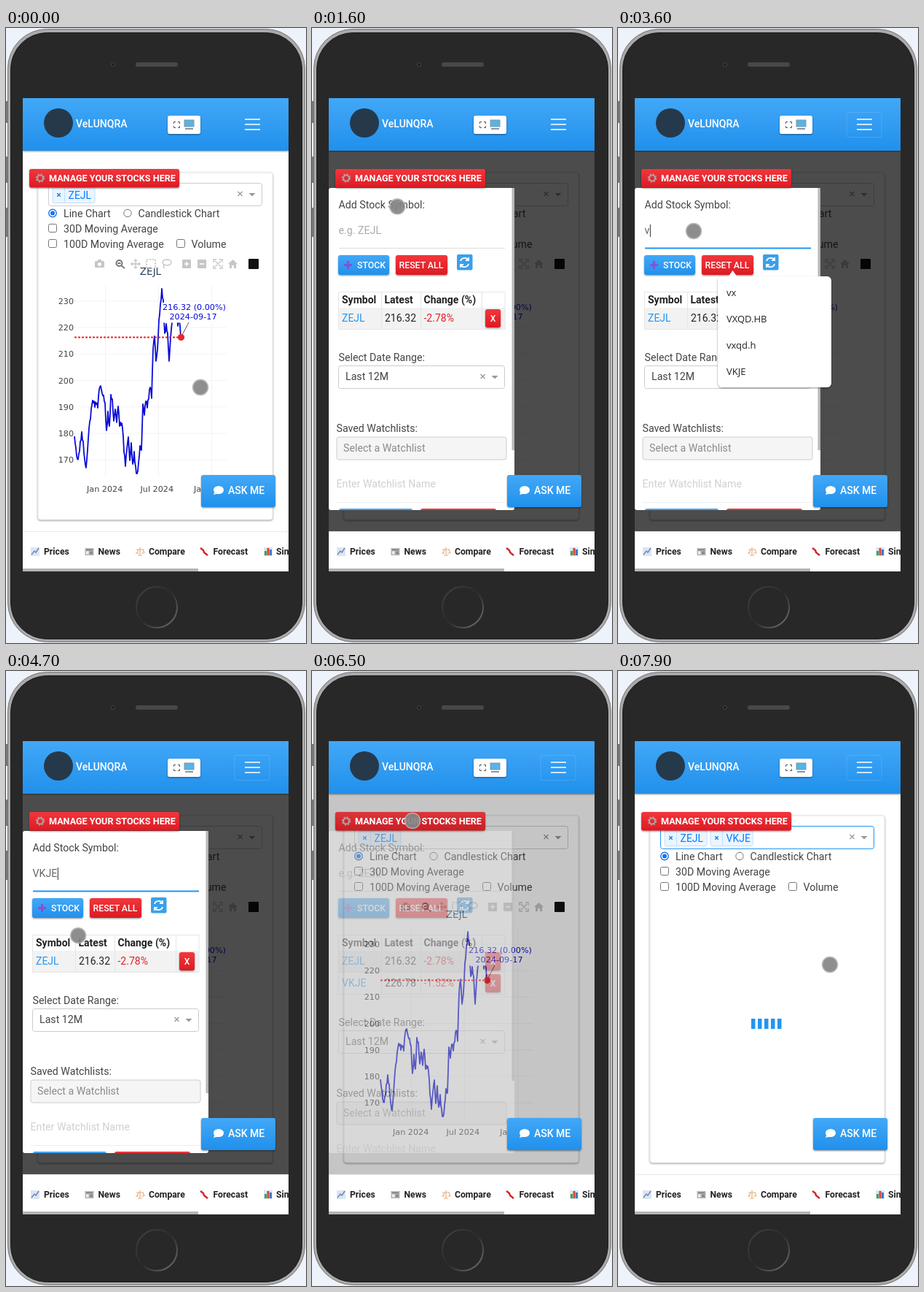
Animation of 412x842 px, one loop 8000 ms. Source, as an HTML page:

```html
<!DOCTYPE html>
<html lang="en">
<head>
<meta charset="utf-8">
<title>Stock dashboard on a phone</title>
<style>
html, body { margin: 0; width: 100%; height: 100%; overflow: hidden; background: #eef2fb; }
svg { display: block; width: 100%; height: 100%; font: 14.2px Roboto, sans-serif; }
.plot { font-family: "DejaVu Sans", sans-serif; }
</style>
</head>
<body>
<svg id="stage" viewBox="0 0 412 842"></svg>
<script>
const BLUE = '#2196f3', RED = '#e51c23', INK = '#444', LINK = '#007eff';
const BRAND = 'VeLUNQRA', FIRST = 'ZEJL', SECOND = 'VKJE';

const rect = (x, y, w, h, fill, more = '') =>
  `<rect x="${x}" y="${y}" width="${w}" height="${h}" fill="${fill}" ${more}/>`;
const text = (x, y, str, fill = INK, more = '') =>
  `<text x="${x}" y="${y}" fill="${fill}" ${more}>${str}</text>`;
const path = (d, stroke, width = 1, more = '') =>
  `<path d="${d}" fill="none" stroke="${stroke}" stroke-width="${width}" ${more}/>`;
const dot = (x, y, r, fill, more = '') =>
  `<circle cx="${x}" cy="${y}" r="${r}" fill="${fill}" ${more}/>`;
const group = (id, body, more = '') => `<g id="${id}" ${more}>${body}</g>`;
const font = (size, weight = 400) => `font-size="${size}" font-weight="${weight}"`;
const button = (x, y, w, h, paint, more = '') =>
  rect(x, y, w, h, `url(#${paint})`, `rx="3" filter="url(#shadow)" ${more}`);
const cross = (x, y, s = 3, color = '#999') =>
  path(`M${x - s} ${y - s}l${2 * s} ${2 * s}m0 ${-2 * s}l${-2 * s} ${2 * s}`, color, 1.3);
const clearIcons = (x, y) => cross(x, y) +
  `<path d="M${x + 12} ${y - 1}h9l-4.5 4.5z" fill="#999"/>`;
const linear = (id, top, bottom) => `<linearGradient id="${id}" x2="0" y2="1">
  <stop stop-color="${top}"/><stop offset="1" stop-color="${bottom}"/></linearGradient>`;

const defs = `<defs>
  ${linear('blue', '#42a8f7', '#2190ec')}${linear('red', '#f2363c', '#dc1b23')}
  ${linear('darkBlue', '#3d8fdb', '#2277c6')}${linear('darkRed', '#dc363b', '#c81e25')}
  <linearGradient id="ring" x2="1" y2="1"><stop stop-color="#444"/>
    <stop offset=".5" stop-color="#2a2a2a"/><stop offset="1" stop-color="#777"/></linearGradient>
  <filter id="shadow" x="-10%" y="-20%" width="120%" height="150%">
    <feDropShadow dx="0" dy="1" stdDeviation="1.2" flood-opacity=".45"/></filter>
  <clipPath id="screen">${rect(23, 96, 365, 648, '#fff')}</clipPath>
  <clipPath id="panelClip">${rect(23, 219, 255, 441, '#fff')}</clipPath>
</defs>`;

const phone =
  [[100, 30], [176, 36], [246, 40]].map(([y, h]) => rect(0, y, 4, h, '#777')).join('') +
  rect(2.5, 1.5, 408, 839, '#aaa', 'rx="54" stroke="#777"') +
  rect(6.5, 6.5, 400, 830, '#282828', 'rx="50" stroke="#1a1a1a"') +
  dot(147, 50, 2.5, '#1b1b1b', 'stroke="#484848"') +
  rect(178, 47, 58, 6, '#484848', 'rx="3"') +
  dot(207, 793, 28, 'none', 'stroke="url(#ring)" stroke-width="2"');

const header = rect(23, 96, 365, 72, 'url(#blue)', 'filter="url(#shadow)"') +
  dot(72, 130, 20, '#26394b') +
  text(96, 136, BRAND, '#fff', font(14, 500)) +
  rect(222, 120, 45, 25, '#fff', 'rx="3" filter="url(#shadow)"') +
  path('M230.5 131v-2.500h2.500m3 0h2.500v2.500m0 3v2.500h-2.500m-3 0h-2.500v-2.500', '#555') +
  rect(245, 126, 13, 9, '#55b4e8', 'stroke="#8796a0"') + rect(246, 137, 11, 2, '#8796a0') +
  group('menuBox', rect(314, 115.5, 48, 34, 'none', 'rx="3" stroke="#fff" stroke-opacity=".13"')) +
  path('M328 125h21m-21 7h21m-21 7h21', '#fff', 1.4);

const chip = (x, name) => rect(x, 218.5, 58, 21, '#ebf5ff', 'rx="2" stroke="#c2e0ff"') +
  path(`M${x + 16.5} 219v20`, '#c2e0ff') + cross(x + 8.5, 228.5, 2.2, LINK) +
  text(x + 21.5, 234, name, LINK, font(14));
const checkbox = (x, y) => rect(x - 5.500, y - 5.500, 11, 11, '#fff', 'rx="2" stroke="#767676"');

const card = rect(44, 198, 322, 475, '#fff', 'rx="3" stroke="#e4e4e4" filter="url(#shadow)"') +
  rect(58.5, 212.5, 293, 31, '#fff', 'id="picker" rx="3" stroke="#ccc"') +
  chip(64, FIRST) + group('secondChip', chip(127, SECOND)) + clearIcons(321.5, 227) +
  dot(64, 253.500, 5.200, '#fff', 'stroke="#1a73e8" stroke-width="1.4"') + dot(64, 253.500, 3, '#1a73e8') +
  dot(167, 253.500, 5.200, '#fff', 'stroke="#767676"') +
  checkbox(64, 274) + checkbox(64, 295) + checkbox(240, 295) +
  text(79, 259, 'Line Chart') + text(181.5, 259, 'Candlestick Chart') +
  text(79, 280, '30D Moving Average') + text(79, 301, '100D Moving Average') +
  text(254.5, 301, 'Volume');

const GREY = '#c6c6c6';
const toolbar = rect(122, 319, 13, 9, GREY, 'rx="1.5"') + rect(126, 317, 5, 3, GREY) +
  dot(128.5, 323.5, 2.5, '#fff') +
  dot(155.5, 322, 4, 'none', 'stroke="#777" stroke-width="2"') + path('M158 325l5 4m-9.500-7h4', '#777', 1.8) +
  path('M172 323h12m-6-6v12m-4-8l-2 2 2 2m8-4l2 2-2 2m-6-6l2-2 2 2m-4 8l2 2 2-2', GREY, 1.4) +
  rect(193, 317, 12, 12, 'none', `stroke="${GREY}" stroke-width="1.6" stroke-dasharray="2.500 1.500"`) +
  `<ellipse cx="221" cy="321" rx="6" ry="4" fill="none" stroke="${GREY}" stroke-width="1.4"/>` +
  path('M217 324q-2 3 1 5', GREY, 1.4) +
  [248, 269].map(x => rect(x - 6, 317, 12, 12, GREY, 'rx="1"') + path(`M${x - 3} 323h6`, '#fff', 1.6)).join('') +
  path('M248 320v6', '#fff', 1.6) +
  path('M285 321v-4h4m4 0h4v4m0 4v4h-4m-4 0h-4v-4m2-6l8 8m0-8l-8 8', GREY, 1.4) +
  `<path d="M305 323l6.500-6 6.500 6h-2v6h-3v-4h-3v4h-3v-6z" fill="${GREY}"/>` +
  rect(333, 316, 14, 14, '#111', 'rx="1"');

// Daily prices as screen heights, two pixels apart
const prices = [559, 575, 590, 583, 566, 553, 566, 590, 602, 578, 548, 535, 516, 513, 519, 515, 520, 495,
  490, 500, 503, 513, 551, 525, 545, 502, 508, 538, 522, 540, 518, 545, 544, 548, 580, 600, 577, 560, 592,
  568, 597, 580, 600, 610, 595, 572, 578, 515, 530, 511, 520, 508, 492, 507, 440, 422, 456, 440, 400, 378,
  357, 372, 418, 405, 418, 456, 425, 403, 390, 395, 392, 408, 400, 423];
const wiggle = i => Math.sin(i * 12.9) * 5;
const priceLine = 'M' + prices.map((y, i) =>
  i ? `${93 + 2 * i} ${((y + prices[i - 1]) / 2 + wiggle(i)).toFixed(1)} ${94 + 2 * i} ${y}` : `94 ${y}`).join('L');
const levels = [230, 220, 210, 200, 190, 180, 170];
const levelY = v => 374 + (230 - v) * 3.62;

const chart = text(198.5, 338, FIRST, '#2a3f5f', font(13.5) + ' text-anchor="middle"') + toolbar +
  levels.map(v => path(`M94 ${levelY(v)}H303`, '#f1f3f8') +
    text(93, levelY(v) + 4, v, INK, font(11.2) + ' text-anchor="end"')).join('') +
  path('M136.500 352V614M209.500 352V614M282.500 352V614', '#f1f3f8') +
  path(priceLine, '#0a0ad8', 1.8, 'stroke-linejoin="round"') +
  path('M94 423.500H240', '#e8262c', 2, 'stroke-dasharray="3 2"') +
  rect(214.5, 376, 89, 27.5, '#fff') + path('M251 403L241 422', '#555') +
  dot(240.5, 423.5, 4.6, '#e8262c') +
  text(258.5, 386, '216.32 (0.00%)', '#0a0ad8', font(11.2) + ' text-anchor="middle"') +
  text(257, 399, '2024-09-17', '#0a0ad8', font(11.2) + ' text-anchor="middle"') +
  ['Jan 2024', 'Jul 2024', 'Jan 2025'].map((s, i) => text(111 + 73.5 * i, 635, s, INK, font(11.2))).join('');

const loader = [0, 1, 2, 3, 4].map(i => rect(183 + 9 * i, 476, 5.5, 14, BLUE)).join('');

const deleteKey = y => button(238, y, 21, 25, 'red') +
  text(248.5, y + 17, 'X', '#fff', font(12, 500) + ' text-anchor="middle"');
const row = (y, name, price, change) => rect(36, y, 229, 29.5, y < 400 ? '#f2f2f2' : '#fff') +
  path(`M36.500 ${y}v29.500h228.500v-29.500M95.500 ${y}v29.500M149.500 ${y}v29.500M233.500 ${y}v29.500`, '#e6e6e6') +
  text(41, y + 19, name, BLUE, font(14)) + text(100, y + 19, price, '#222', font(14)) +
  text(153.500, y + 19, change, RED, font(14)) + deleteKey(y + 2);

const lower = text(36.5, 456, 'Select Date Range:') +
  rect(36.5, 462.5, 228, 31, '#fff', 'rx="3" stroke="#ccc"') + text(46, 482, 'Last 12M') + clearIcons(234.5, 477) +
  text(33.5, 553, 'Saved Watchlists:') +
  rect(34, 560, 233, 31, '#f5f5f5', 'rx="3" stroke="#ccc"') + text(43, 580, 'Select a Watchlist', '#8b8b8b') +
  text(33.5, 629, 'Enter Watchlist Name', '#d0d0d0') + path('M34 649.500H267', '#eee') +
  button(37, 658, 101, 27, 'blue') + button(149, 658, 104, 27, 'red');

const panel = rect(23, 219, 255, 441, '#fff', 'rx="3"') +
  text(36.5, 247, 'Add Stock Symbol:') +
  text(36.5, 282, '', '#666', 'id="entry"') + rect(0, 269, 1, 17, '#333', 'id="caret"') +
  path('M37 301.500H265', '#ddd', 1, 'id="underline"') +
  button(36, 311, 70, 27, 'blue', 'id="addKey"') + path('M44 324.500h11m-5.500-5.500v11', '#8a4fd0', 3) +
  text(62, 329, 'STOCK', '#fff', font(12.3, 500)) +
  button(115, 311, 71, 27, 'red') + text(119.5, 329, 'RESET ALL', '#fff', font(12.3, 500)) +
  rect(199, 310, 21.5, 21.5, '#3aa0ea', 'rx="2"') +
  path('M204 319a6 6 0 0 1 11-1m0-4v4h-4m4 5a6 6 0 0 1-11 1m0 4v-4h4', '#fff', 1.9) +
  path('M36.500 383v-21.500h228.500v21.500M95.500 361v22M149.500 361v22M233.500 361v22', '#e6e6e6') +
  text(41, 377, 'Symbol', '#222', font(14, 700)) + text(99.5, 377, 'Latest', '#222', font(14, 700)) +
  text(153.5, 377, 'Change (%)', '#222', font(14, 700)) +
  row(383, FIRST, '216.32', '-2.78%') + group('secondRow', row(413, SECOND, '226.78', '-1.52%')) +
  group('lower', lower) + rect(274.5, 219, 3.5, 359, '#b8b8b8', 'id="bar"');

const suggestions = `<path d="M151 341l6.500-9 6.500 9z" fill="#fff"/>` +
  rect(137, 340, 156, 152, '#fff', 'rx="6" filter="url(#shadow)"') +
  ['vx', 'VXQD.HB', 'vxqd.h', SECOND].map((s, i) =>
    text(149, 367 + 36 * i, s, '#222', 'font-size="13" font-family="Open Sans, sans-serif"')).join('');

const manage = button(32, 193, 206, 25.5, 'red', 'id="manageKey"') +
  dot(47, 205.5, 4, 'none', 'stroke="#b0a0a0" stroke-width="2.2"') +
  dot(47, 205.5, 5.5, 'none', 'stroke="#b0a0a0" stroke-width="1.6" stroke-dasharray="2 2.320"') +
  text(59, 210, 'MANAGE YOUR STOCKS HERE', '#fff', font(12.6, 700));

const ask = button(268, 612, 102, 44, 'blue') +
  `<ellipse cx="292" cy="632.500" rx="7" ry="5.500" fill="#fff"/><path d="M287 634l-2 5 7-2z" fill="#fff"/>` +
  text(305, 638, 'ASK ME', '#fff', font(14, 500));

const tabs = rect(23, 689, 365, 55, '#fff') + path('M23 689.500H388', '#e8e8e8') +
  [[52, 'Prices'], [126.5, 'News'], [196, 'Compare'], [284.5, 'Forecast'], [371, 'Simulate']]
    .map(([x, s]) => text(x, 721, s, '#222', font(12.2, 700))).join('') +
  rect(34, 711, 12, 12, '#dbe6f0') + path('M35 721l4-5 2 2 4-6', '#7285c0', 1.5) +
  rect(108.5, 712, 12, 10, '#b4b4b4') + path('M110 714.500h9m-4 3h4m-4 2h4', '#666') + rect(110, 716.500, 3.500, 4, '#eee') +
  path('M179 714h10m-5-3v11m-3 0h6m-9-3h4m4 0h4m-8-5l-2 5m8-5l2 5', '#e8b080', 1.2) +
  path('M267 712l4 3 1 3 5 4', '#d8232a', 2.4) +
  rect(354, 711, 12, 12, '#dbe6f0') + rect(355, 716, 3, 6, '#3aa655') + rect(358.5, 712, 3, 10, '#d8433d') +
  rect(362, 714, 3, 8, '#3b78c8') + rect(23, 740, 241, 4, '#b5b5b5');

const stage = document.getElementById('stage');
stage.innerHTML = defs + rect(0, 0, 412, 842, '#eef2fb') + phone + `<g clip-path="url(#screen)">` +
  rect(23, 96, 365, 648, '#fff') + card + group('chart', chart, 'class="plot"') + group('loader', loader) +
  rect(23, 168, 365, 521, '#000', 'id="shade"') + header + tabs +
  group('panel', panel, 'clip-path="url(#panelClip)"') + manage + ask + group('hints', suggestions) +
  group('touch', dot(0, 0, 10.5, '#858585', 'stroke="#b3b3b3" stroke-width="1.5"'), 'opacity=".92"') + '</g>';

const $ = id => document.getElementById(id);
const clamp = v => Math.min(1, Math.max(0, v));
const ease = v => v * v * (3 - 2 * v);
const show = (id, on) => $(id).setAttribute('opacity', +on);

// Pointer stops: time, x, y
const stops = [[0, 267, 492], [300, 267, 492], [1050, 138, 192], [1400, 138, 192], [1750, 104, 278],
  [3700, 104, 278], [4200, 178, 470], [4400, 178, 470], [4850, 72, 325], [5250, 72, 325], [5700, 195, 364],
  [5850, 195, 364], [6300, 138, 205], [6600, 138, 205], [6950, 291, 271], [7050, 291, 271],
  [7300, 291, 228], [7550, 291, 258], [7850, 291, 402], [8000, 291, 402]];
const typing = [[0, ''], [1850, 'v'], [1950, 'vj'], [2060, 'vjk'], [2180, 'vjke'],
  [2850, 'vjk'], [3000, 'vj'], [3150, 'v'], [4350, SECOND], [5200, '']];

function pointer(t) {
  const i = stops.findIndex(s => s[0] > t);
  const [a, x, y] = stops[i - 1], [b, u, v] = stops[i];
  const k = ease((t - a) / (b - a));
  return [x + (u - x) * k, y + (v - y) * k];
}

function draw(now) {
  const t = now % 8000, within = (a, b) => t >= a && t < b;
  const open = clamp((t - 1350) / 150) * clamp((6550 - t) / 150);
  const focused = within(1800, 4850), added = t >= 5300, chosen = t >= 7580;
  show('shade', open * 0.7);
  show('panel', open);
  show('hints', within(3250, 4350));
  show('menuBox', t >= 2200);
  show('chart', !chosen);
  show('loader', chosen);
  show('secondChip', chosen);
  show('secondRow', added);
  $('lower').setAttribute('transform', `translate(0 ${added ? 30 : 0})`);
  $('bar').setAttribute('height', added ? 342 : 359);
  $('picker').setAttribute('stroke', t >= 7300 ? BLUE : '#ccc');
  $('manageKey').setAttribute('fill', within(1050, 1450) || within(6250, 7250) ? 'url(#darkRed)' : 'url(#red)');
  $('addKey').setAttribute('fill', within(4850, 6400) ? 'url(#darkBlue)' : 'url(#blue)');
  $('underline').setAttribute('stroke', focused ? BLUE : '#ddd');
  $('underline').setAttribute('stroke-width', focused ? 2 : 1);

  const typed = typing.filter(s => s[0] <= t).pop()[1], entry = $('entry');
  entry.textContent = typed || 'e.g. ' + FIRST;
  entry.setAttribute('fill', typed ? '#666' : '#aaa');
  $('caret').setAttribute('x', 37 + (typed ? entry.getComputedTextLength() : 0));
  show('caret', focused);
  $('touch').setAttribute('transform', `translate(${pointer(t)})`);
  requestAnimationFrame(() => draw(performance.now() - start));
}
const start = performance.now();
draw(0);
</script>
</body>
</html>
```
